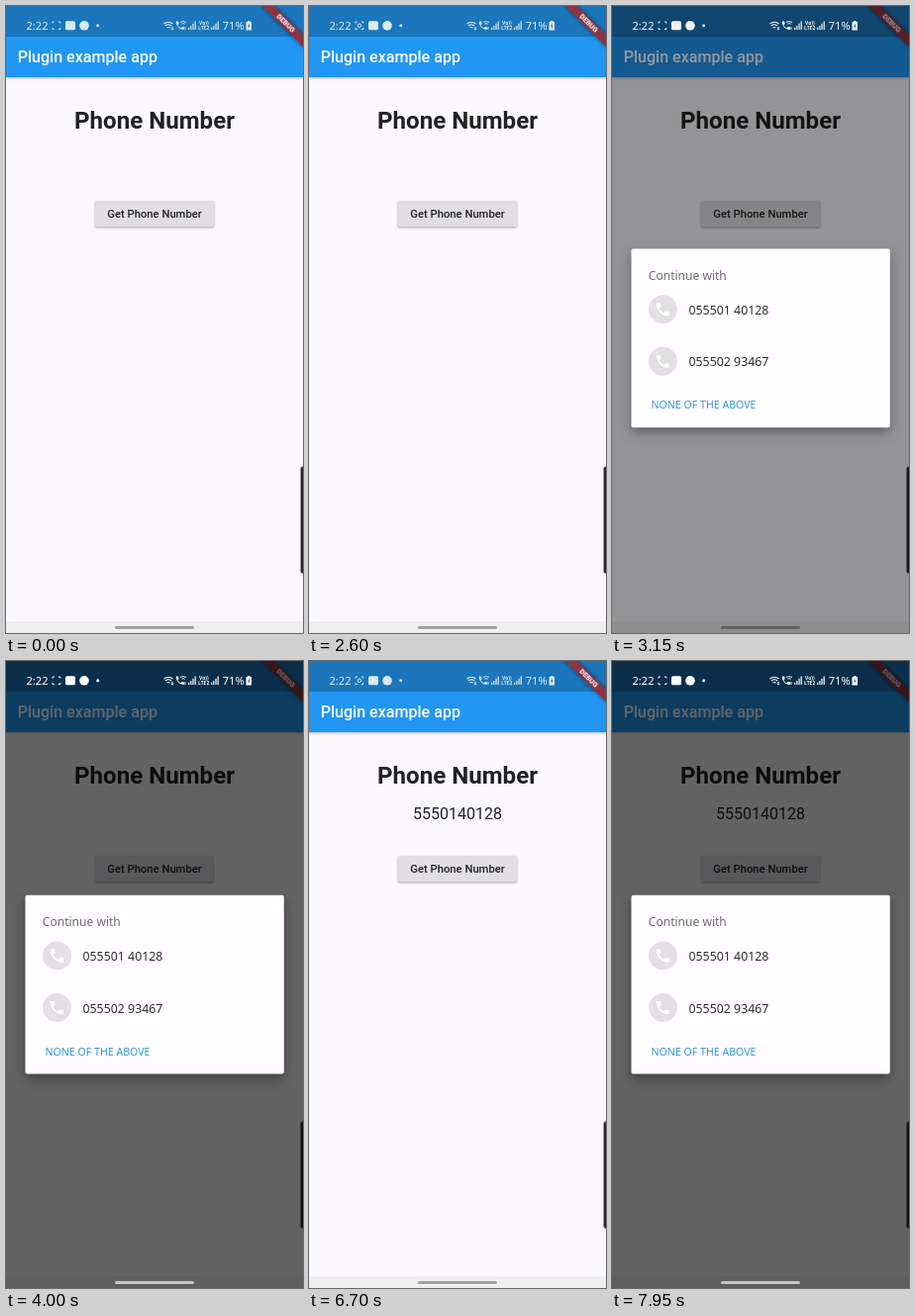
An HTML page for the animation above (8 s loop, 300x634 px).

```html
<!DOCTYPE html>
<html lang="en">
<head>
<meta charset="utf-8">
<title>Plugin example app</title>
<style>
  html, body { margin: 0; width: 100%; height: 100%; overflow: hidden; background: #faf8fc; }
  svg { display: block; width: 100%; height: 100%; }
  text { font-family: Roboto, sans-serif; }
  .system text { font-family: "Noto Sans", sans-serif; }
  .mid { text-anchor: middle; }
  .line { fill: none; stroke: #fff; }
  #dialog { filter: drop-shadow(0 5px 6px rgba(0, 0, 0, .35)); }
  #button { filter: drop-shadow(0 1px 1px rgba(0, 0, 0, .35)); }
  #appbar { filter: drop-shadow(0 1px 1.5px rgba(0, 0, 0, .25)); }
  #banner { filter: drop-shadow(0 0 2px rgba(0, 0, 0, .5)); }
</style>
</head>
<body>
<svg viewBox="0 0 300 634">
  <defs>
    <path id="phone" d="M6.62 10.79c1.44 2.83 3.76 5.14 6.59 6.59l2.2-2.2c.27-.27.67-.36 1.02-.24 1.12.37 2.33.57 3.57.57.55 0 1 .45 1 1V20c0 .55-.45 1-1 1-9.39 0-17-7.61-17-17 0-.55.45-1 1-1h3.5c.55 0 1 .45 1 1 0 1.25.2 2.45.57 3.57.11.35.03.74-.25 1.02z" fill="#fff"/>
    <g id="avatar">
      <circle r="14.5" fill="#e2e0e2"/>
      <use href="#phone" transform="scale(.73) translate(-12 -12)"/>
    </g>
    <path id="signal" d="M0 9h1.2V6.800H0zM2.200 9h1.200V5H2.200zM4.400 9h1.200V2.800H4.400zM6.600 9h1.200V.500H6.600z" fill="#fff"/>
  </defs>

  <!-- App -->
  <rect width="300" height="634" fill="#faf8fc"/>
  <rect id="appbar" width="300" height="72" fill="#2196f3"/>
  <rect width="300" height="31" fill="#1b76bb"/>
  <text x="11.700" y="57" font-size="16.060" font-weight="500" fill="#fff">Plugin example app</text>
  <text class="mid" x="150" y="124" font-size="24.100" font-weight="700" fill="#212022">Phone Number</text>
  <text id="result" class="mid" x="150" y="159.500" font-size="16.060" fill="#222">5550140128</text>
  <rect id="button" x="90" y="197" width="120" height="26.300" rx="1.500" fill="#e0dee1"/>
  <text class="mid" x="150" y="213.800" font-size="11.240" font-weight="500" fill="#222">Get Phone Number</text>
  <g id="banner" transform="translate(300) rotate(45)">
    <rect x="-30" y="20.400" width="60" height="8.800" fill="#8b3444"/>
    <text class="mid" y="27.400" font-size="7.200" font-weight="900" fill="#fff" fill-opacity=".9">DEBUG</text>
  </g>
  <rect y="623" width="300" height="11" fill="#f0eff0"/>
  <path d="M0 623h300" stroke="#e4e2e5" stroke-width=".7"/>
  <rect x="110" y="627" width="80" height="3" rx="1.500" fill="#a2a1a2"/>
  <rect x="297.500" y="465.500" width="8" height="108.500" rx="3" fill="#28282d" stroke="#aaa" stroke-width=".5"/>

  <rect id="dim" width="300" height="634"/>
  <rect id="lightPill" x="110" y="627" width="80" height="3" rx="1.500" fill="#c6c5c6"/>

  <!-- Status bar -->
  <g id="status" class="system" fill="#fff">
    <text x="20.500" y="24" font-size="11.100">2:22</text>
    <path class="line" d="M47 17.500V16h1.800M53 16h1.800v1.500M47 22v1.600h1.800M53 23.600h1.800V22"/>
    <circle id="capture" class="line" cx="50.900" cy="19.800" r="1.800"/>
    <rect x="60" y="15.300" width="10" height="9" rx="1.500"/>
    <circle cx="79" cy="19.800" r="4.800"/>
    <circle cx="92.700" cy="19.800" r="1.500"/>
    <path class="line" stroke-width="1.100" d="M159.500 18q4.500-3.600 9 0M161 20q3-2.400 6 0M162.600 22q1.400-1 2.800 0"/>
    <path d="M166.500 22.500l1.500-1.800 1.500 1.800zM166.500 23l1.500 1.500 1.500-1.500z"/>
    <use href="#phone" transform="translate(170.400 14.200) scale(.46)"/>
    <path class="line" stroke-width=".9" d="M176 16.500q3-2 6 0M177.400 18.200q1.700-1.100 3.300 0M181 21v3"/>
    <use href="#signal" x="184" y="15"/>
    <text x="195" y="19.200" font-size="5" font-weight="700">Vo))</text>
    <text x="194" y="24.200" font-size="5" font-weight="700">LTE2</text>
    <use href="#signal" x="207" y="15"/>
    <text x="218.700" y="24" font-size="11.100">71%</text>
    <path d="M244 15h2.500v1h1.500v8.500h-5.500V16h1.500z"/>
    <path d="M245.700 17.500l-1.700 3h1.200l-.5 2.500 1.900-3.300h-1.200z" fill="#1b5f93"/>
  </g>

  <!-- Number picker -->
  <g id="dialog" class="system">
    <rect x="19.500" y="236.800" width="261.300" height="180.700" rx="2" fill="#fffdff"/>
    <text x="36.800" y="268" font-size="12.050" fill="#6e6c6e">Continue with</text>
    <rect id="press" x="26.500" y="272" width="248.500" height="52" rx="4" fill="#7b7a7b"/>
    <use href="#avatar" x="51.500" y="298"/>
    <circle id="pressedAvatar" cx="51.500" cy="298" r="14.500" fill="#5c5b5c"/>
    <use href="#phone" transform="translate(51.500 298) scale(.73) translate(-12 -12)"/>
    <text x="77.500" y="303" font-size="12.350" fill="#2e2d2e">055501 40128</text>
    <use href="#avatar" x="51.500" y="350.500"/>
    <text x="77.500" y="355.500" font-size="12.350" fill="#2e2d2e">055502 93467</text>
    <text x="39.500" y="398.500" font-size="10.600" fill="#3795d6">NONE OF THE ABOVE</text>
  </g>
</svg>
<script>
const LOOP = 8000;
const OPENINGS = [3000, 7250];
const CLOSE = 5350;
const DIM = 0.6;

const el = id => document.getElementById(id);
const fade = (id, value) => el(id).setAttribute("opacity", value);
const ramp = (t, start, length) => Math.min(1, Math.max(0, (t - start) / length));

function draw(t) {
  const openedAt = t < OPENINGS[1] ? OPENINGS[0] : OPENINGS[1];
  const closing = t < OPENINGS[1];
  const enter = ramp(t, openedAt, 350);
  const eased = 1 - (1 - enter) ** 2;
  const dialogExit = closing ? ramp(t, CLOSE, 140) : 0;
  const dimExit = closing ? ramp(t, CLOSE + 70, 300) : 0;
  const shade = eased * (1 - dimExit);

  fade("dim", DIM * shade);
  fade("lightPill", ramp(enter, 0.6, 0.4) * (1 - dimExit));
  fade("status", 0.84 + 0.16 * shade);

  fade("dialog", Math.min(1, enter * 2.5) * (1 - dialogExit));
  el("dialog").setAttribute("transform", `translate(0 ${27 * (1 - eased)})`);

  const press = closing ? ramp(t, 5130, 180) : 0;
  fade("press", press);
  fade("pressedAvatar", press);
  fade("result", t >= CLOSE ? 1 : 0);

  // The screen-capture indicator blinks once a second.
  const blink = t % 1000;
  fade("capture", blink >= 300 && blink < 800 ? 1 : 0);
}

const begin = performance.now();
function tick() {
  draw((performance.now() - begin) % LOOP);
  requestAnimationFrame(tick);
}
tick();
</script>
</body>
</html>
```
